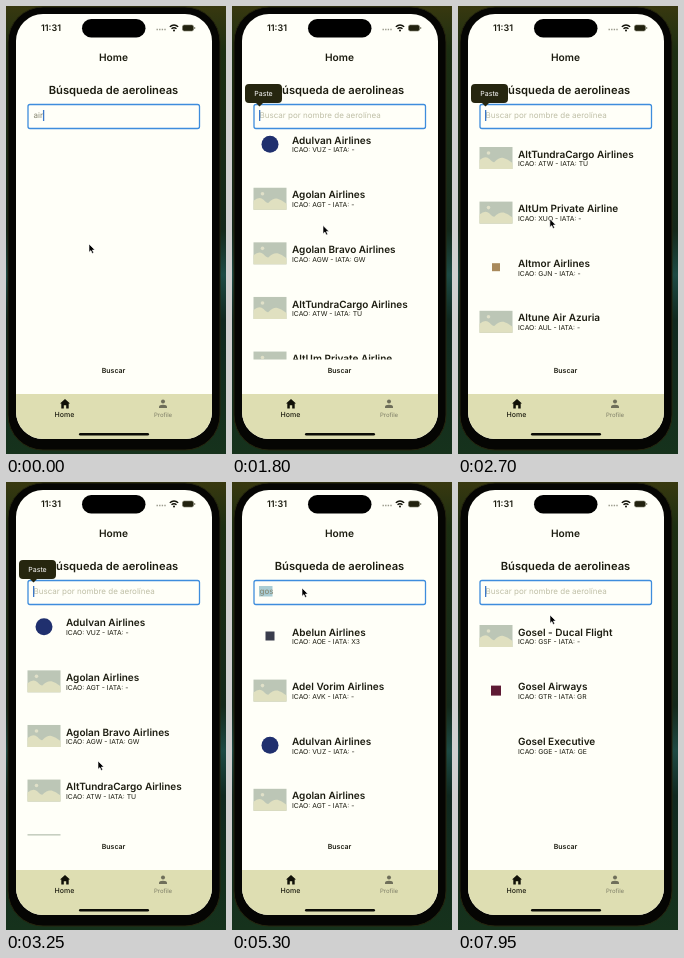
An HTML page that plays this animation: 220 by 448 pixels, repeating every 8000 ms.

```html
<!DOCTYPE html>
<html lang="es">
<head>
<meta charset="utf-8">
<title>Búsqueda de aerolineas</title>
<style>
  html, body { margin: 0; width: 100%; height: 100%; overflow: hidden; background: #000; }
  svg { display: block; width: 100vw; height: 100vh; }
  text { font-family: Inter, "Open Sans", sans-serif; fill: #1c1c10; text-rendering: geometricPrecision; }
  .bold { font-weight: 600; }
  .mid { text-anchor: middle; }
</style>
</head>
<body>
<svg viewBox="0 0 220 448">
  <defs>
    <linearGradient id="wall" x2="0" y2="1">
      <stop offset="0" stop-color="#38380f"/>
      <stop offset=".1" stop-color="#1c2e12"/>
      <stop offset=".5" stop-color="#14281a"/>
      <stop offset=".6" stop-color="#1d4a44"/>
      <stop offset=".7" stop-color="#10281f"/>
      <stop offset="1" stop-color="#16321c"/>
    </linearGradient>
    <clipPath id="screen"><rect x="10" y="8" width="196" height="425" rx="27"/></clipPath>
    <clipPath id="listArea"><rect x="10" y="122" width="196" height="231.5"/></clipPath>
    <g id="noImage">
      <rect width="33" height="22" fill="#bcc6b6"/>
      <path d="M0 13Q6 8 10 12T15 15Q20 10 24 11T33 16V22H0Z" fill="#e0e0c0"/>
      <circle cx="9" cy="6" r="1.8" fill="#e0e0c8"/>
    </g>
  </defs>

  <rect width="220" height="448" fill="url(#wall)"/>
  <rect x="2" y="1" width="212" height="443" rx="35" fill="#050503" stroke="#25250e"/>

  <g clip-path="url(#screen)">
    <rect x="10" y="8" width="196" height="425" fill="#fffff8"/>
    <text class="mid bold" x="107.5" y="54.5" font-size="10.2">Home</text>
    <text class="mid bold" x="107.5" y="87.5" font-size="11.2">Búsqueda de aerolineas</text>

    <g clip-path="url(#listArea)">
      <g id="allRows"></g>
      <g id="foundRows"></g>
    </g>

    <rect x="22" y="98.5" width="171.5" height="24" rx="2" fill="#fffff8" stroke="#3e8ddd" stroke-width="1.3"/>
    <rect id="mark" x="27" y="104" width="13.5" height="10.5" fill="#a9cdd4"/>
    <text id="field" x="27.5" y="111.7" font-size="8"></text>
    <rect id="caret" y="104" width="1.3" height="11" fill="#3b78c8"/>

    <g id="paste">
      <path d="M17 78H46Q50 78 50 82V93Q50 97 46 97H31L27.5 100.5L24 97H17Q13 97 13 93V82Q13 78 17 78Z" fill="#26260f"/>
      <text class="mid" x="31.5" y="90" font-size="7" style="fill:#fff">Paste</text>
    </g>

    <rect id="pressed" x="86" y="355" width="44" height="19" rx="1" fill="#e6e6b6"/>
    <text class="mid bold" x="107.5" y="367" font-size="7">Buscar</text>

    <rect x="10" y="388" width="196" height="45" fill="#dedeb2"/>
    <path d="M59 393L64 397.6H62.7V402.5H60.2V399.3H57.8V402.5H55.3V397.6H54Z" fill="#111108"/>
    <text class="mid" x="58.5" y="411" font-size="7" font-weight="500">Home</text>
    <g fill="#6f6f5a">
      <circle cx="157" cy="395.5" r="2"/>
      <path d="M153 402V401Q153 398.7 157 398.7T161 401V402Z"/>
    </g>
    <text class="mid" x="157" y="411" font-size="6" style="fill:#7c7c66">Profile</text>
    <rect x="73" y="427" width="70" height="2.6" rx="1.3" fill="#0c0c06"/>

    <text class="bold" x="35" y="25.3" font-size="9">11:31</text>
    <rect x="76" y="13" width="63.5" height="18.5" rx="9.2" fill="#000"/>
    <path d="M150.5 23.5H160" stroke="#99998a" stroke-width="1.4" stroke-dasharray="1.4 1.2"/>
    <g fill="none" stroke="#111108" stroke-width="1.4">
      <path d="M163.8 20.8Q168 17 172.2 20.8M165.5 22.8Q168 20.6 170.5 22.8"/>
    </g>
    <circle cx="168" cy="24.6" r="1" fill="#111108"/>
    <rect x="176.5" y="19" width="11" height="6" rx="1.8" fill="#22220f" stroke="#777764" stroke-width=".6"/>
    <rect x="188.2" y="21" width="1" height="2" fill="#777764"/>
  </g>

  <g id="pointer">
    <circle id="touch" r="10" fill="#ffffff55" stroke="#111108" stroke-width="1.6"/>
    <path d="M0 0V8.3L1.9 6.6L3.2 9.5L4.7 8.8L3.4 6H6Z" fill="#000" stroke="#fff" stroke-width=".6"/>
  </g>
</svg>

<script>
const LOOP = 8000, ROW_HEIGHT = 54.6, FIRST_ROW = 150;
const $ = id => document.getElementById(id);

// [name, ICAO, IATA, picture]; a picture is "none", "photo" or [shape, colour, size]
const airlines = [
  ["Abelun Airlines", "AOE", "X3", ["square", "#3a3d4c", 9]],
  ["Adel Vorim Airlines", "AVK", "-", "photo"],
  ["Adulvan Airlines", "VUZ", "-", ["circle", "#20306e", 17]],
  ["Agolan Airlines", "AGT", "-", "photo"],
  ["Agolan Bravo Airlines", "AGW", "GW", "photo"],
  ["AltTundraCargo Airlines", "ATW", "TU", "photo"],
  ["AltUm Private Airline", "XUO", "-", "photo"],
  ["Altmor Airlines", "GJN", "-", ["square", "#a98a5c", 8]],
  ["Altune Air Azuria", "AUL", "-", "photo"],
];
const matches = [
  ["Gosel - Ducal Flight", "GSF", "-", "photo"],
  ["Gosel Airways", "GTR", "GR", ["square", "#5e1a34", 10]],
  ["Gosel Executive", "GGE", "GE", "none"],
];

function picture(kind, y) {
  if (kind === "none") return "";
  if (kind === "photo") return `<use href="#noImage" x="21.5" y="${y - 7}"/>`;
  const [shape, colour, size] = kind;
  const radius = shape === "circle" ? size / 2 : 0;
  return `<rect x="${38 - size / 2}" y="${y + 4 - size / 2}" width="${size}" height="${size}" rx="${radius}" fill="${colour}"/>`;
}

function rowMarkup([name, icao, iata, kind], index) {
  const y = FIRST_ROW + index * ROW_HEIGHT;
  return picture(kind, y) +
    `<text class="bold" x="60" y="${y + 3.6}" font-size="10">${name}</text>` +
    `<text x="60" y="${y + 12.3}" font-size="6.8">ICAO: ${icao} - IATA: ${iata}</text>`;
}
$("allRows").innerHTML = airlines.map(rowMarkup).join("");
$("foundRows").innerHTML = matches.map(rowMarkup).join("");

// Keys are [time, value, ...]; each stretch is eased in and out.
function track(keys, t) {
  const next = keys.findIndex(key => key[0] > t);
  if (next === 0) return keys[0].slice(1);
  if (next < 0) return keys[keys.length - 1].slice(1);
  const a = keys[next - 1], b = keys[next];
  const p = (t - a[0]) / (b[0] - a[0]), eased = p * p * (3 - 2 * p);
  return a.slice(1).map((v, i) => v + (b[i + 1] - v) * eased);
}

const pointerKeys = [
  [0, 83, 238], [500, 80, 108], [800, 80, 108], [1250, 92, 215],
  [1400, 92, 235], [1600, 91, 195], [1950, 91, 235], [2150, 91, 215],
  [2300, 91, 200], [2820, 92, 215], [3080, 92, 279], [3280, 92, 279],
  [4050, 69, 102], [5300, 70, 106], [6250, 97, 363], [6400, 97, 363],
  [6500, 95, 346], [7300, 92, 133],
];
const scrollKeys = [[1350, 0], [2310, 275], [2815, 275], [3613, 0]];
const pasteKeys = [[1130, 0], [1350, 1], [3600, 1], [3800, 0]];
const pressKeys = [[6280, 0], [6350, 1], [6500, 1], [6750, 0]];
const typing = [[0, "air"], [450, ""], [4700, "g"], [4900, "go"], [5100, "gos"], [7400, ""]];
const touches = [[700, 800], [1400, 1600], [1980, 2300], [2820, 3080], [4100, 4200], [6260, 6400]];

const during = (t, from, to) => t >= from && t < to;
const show = (id, on) => $(id).setAttribute("visibility", on ? "visible" : "hidden");

function draw(t) {
  const typed = typing.filter(step => step[0] <= t).pop()[1];
  const field = $("field");
  field.textContent = typed || "Buscar por nombre de aerolínea";
  field.style.fill = typed ? "#85856f" : "#c0c0a8";
  const marked = during(t, 5100, 6650);
  show("mark", marked);
  show("caret", !marked);
  $("caret").setAttribute("x", typed ? 27.5 + field.getComputedTextLength() : 27);

  show("allRows", during(t, 450, 6650));
  show("foundRows", t >= 7400);
  $("allRows").setAttribute("transform", `translate(0 ${-track(scrollKeys, t)[0]})`);

  $("paste").setAttribute("opacity", track(pasteKeys, t)[0]);
  $("pressed").setAttribute("opacity", track(pressKeys, t)[0]);
  show("touch", touches.some(([from, to]) => during(t, from, to)));
  $("pointer").setAttribute("transform", `translate(${track(pointerKeys, t)})`);
}

function frame() {
  draw(performance.now() % LOOP);
  requestAnimationFrame(frame);
}
frame();
</script>
</body>
</html>
```
